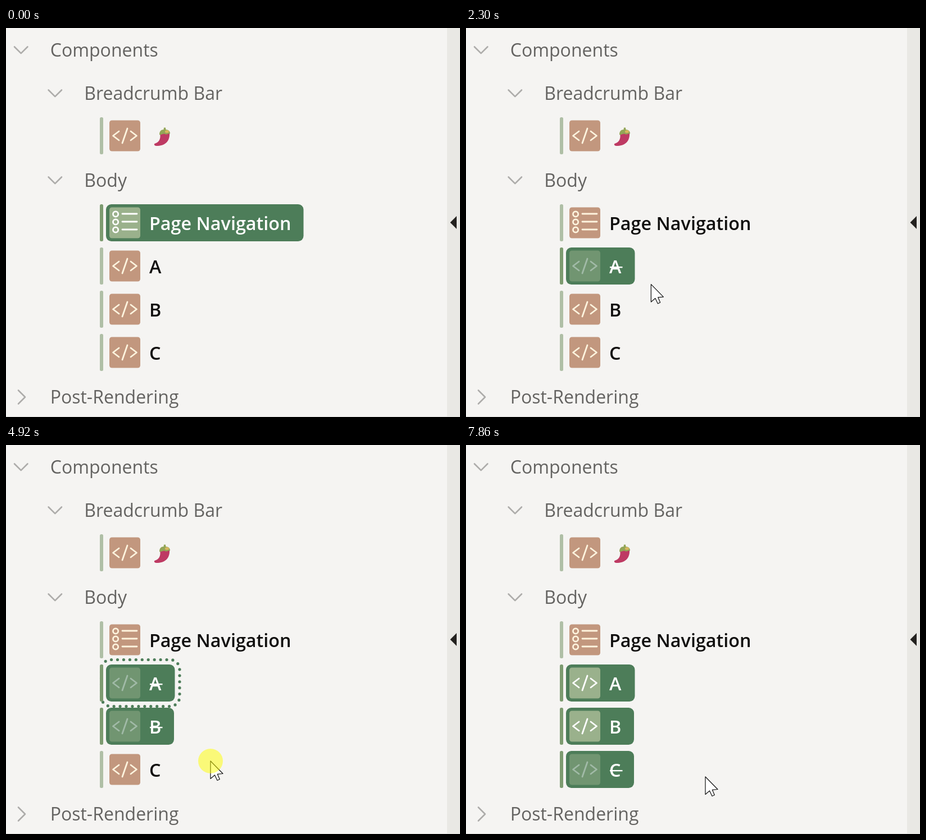
An HTML page that plays this animation: 808 by 693 pixels, repeating every 8 s.

```html
<!DOCTYPE html>
<html lang="en">
<head>
<meta charset="utf-8">
<title>Component tree</title>
<style>
  html, body { margin: 0; width: 100%; height: 100%; overflow: hidden; background: #f5f4f2; }
  svg { display: block; width: 808px; height: 693px; }
  text { font: 32px "Open Sans", "Noto Sans", sans-serif; fill: #646361; }
  .chevron { fill: none; stroke: #adacaa; stroke-width: 2.6; stroke-linecap: round; stroke-linejoin: round; }
  .pill { fill: none; }
  .bar { fill: #afbfa6; }
  .tile { fill: #c2977e; }
  .glyph { fill: none; stroke: #fff4de; stroke-width: 2.8; stroke-linecap: round; stroke-linejoin: round; }
  .label { font-size: 32.3px; font-weight: 600; fill: #100f0e; }
  .strike { fill: #100f0e; visibility: hidden; }
  .ring { fill: none; stroke: #4d7d59; stroke-width: 5.2; stroke-linecap: round; visibility: hidden; }
  .hover .pill { fill: #ebe9e6; }
  .selected .pill { fill: #4d7d59; }
  .selected .bar { fill: #7d9b70; }
  .selected .tile { fill: #9ab18c; }
  .selected .glyph { stroke: #fff; }
  .selected .label, .selected .strike { fill: #fff; }
  .struck .icon { opacity: .47; }
  .struck .strike, .focus .ring { visibility: visible; }
</style>
</head>
<body>
<svg viewBox="0 0 808 693">
  <rect width="808" height="693" fill="#f5f4f2"/>
  <rect x="785" width="23" height="693" fill="#e9e8e4"/>
  <rect y="692" width="808" height="1" fill="#dfdedb"/>
  <path d="M790.500 346.500L802 335V358Z" fill="#24221f"/>
  <g id="tree"></g>
  <g id="pepper">
    <path d="M274 188C276 198 272 204 264.500 206C262.500 208 265 210 268 210C282 210 292 203 291 187Z" fill="#be3a63"/>
    <path d="M273 190C273 184 276 181 280.500 181L281 177.500H284L284.500 181C289 181 292.500 184 292 188.500C288 187 286 191 283 189C280 187.500 277 191 273 190Z" fill="#93a557"/>
    <ellipse cx="286.500" cy="184.500" rx="3.600" ry="2.500" fill="#d8b65e"/>
  </g>
  <path id="cursor" d="M0 0V31.500L7.500 25L12 34.500L16.300 32.500L12.300 23.300L22 22.500Z"
        fill="#fff" stroke="#111" stroke-width="1.200" stroke-linejoin="round"/>
  <circle id="press" r="22" fill="#ff0" fill-opacity=".5"/>
</svg>
<script>
const LOOP = 8000, STEP = 70, PRESS = 130;
const byId = id => document.getElementById(id);
const lineTop = line => Math.round(159.3 + 77.2 * (line - 2));

const CODE = "M201 25L190.500 33L201 41M216 20L207 46M222 25L232.500 33L222 41";
const LIST = [0, 1, 2].map(i =>
  `M190.500 ${17.5 + 14 * i}a4.600 4.600 0 1 0 9.200 0a4.600 4.600 0 1 0 -9.200 0m16.500 -.5h26`).join("");

const HEADS = [
  { line: 0, depth: 0, name: "Components" },
  { line: 1, depth: 1, name: "Breadcrumb Bar" },
  { line: 3, depth: 1, name: "Body" },
  { line: 8, depth: 0, name: "Post-Rendering", closed: true }
];

const ROWS = [
  { key: "icon", line: 2, width: 121, name: "", glyph: CODE },
  { key: "P", line: 4, width: 351.5, name: "Page Navigation", glyph: LIST },
  { key: "A", line: 5, width: 122.5, name: "A", glyph: CODE },
  { key: "B", line: 6, width: 121, name: "B", glyph: CODE },
  { key: "C", line: 7, width: 121, name: "C", glyph: CODE }
];

const EVENTS = [
  { at: 690, type: "focus", key: "P" },
  { at: 820, type: "click", key: "A" },
  { at: 1550, type: "toggle" },
  { at: 2700, type: "click", key: "B" },
  { at: 3310, type: "toggle" },
  { at: 4380, type: "add", key: "A" },
  { at: 5050, type: "add", key: "C" },
  { at: 6190, type: "toggle" },
  { at: 7000, type: "toggle" },
  { at: 7860, type: "toggle" }
];

const easeOut = u => Math.sin(u * Math.PI / 2);
const easeInOut = u => (1 - Math.cos(u * Math.PI)) / 2;

// Each move follows a quadratic curve: start, control, end.
const MOVES = [
  { from: 70, to: 560, ease: easeOut, path: [[691, 672], [440, 480], [260, 435]] },
  { from: 1880, to: 2510, ease: easeInOut, path: [[260, 435], [370, 410], [310, 490]] },
  { from: 3840, to: 4190, ease: easeInOut, path: [[310, 490], [300, 450], [281, 427]] },
  { from: 4380, to: 4590, ease: easeInOut, path: [[281, 427], [305, 480], [364, 563]] },
  { from: 5180, to: 5390, ease: easeInOut, path: [[364, 563], [390, 585], [426, 591]] }
];

function ring(width) {
  const r = 17, w = width + 17 - 2 * r, h = 83 - 2 * r;
  const length = 2 * (w + h) + 2 * Math.PI * r;
  const gap = length / Math.round(length / 11);
  const arc = (x, y) => `a${r} ${r} 0 0 1 ${x} ${y}`;
  return `<path class="ring" stroke-dasharray="0 ${gap}" d="M169.500 57.500v${-h}${arc(r, -r)}h${w}${arc(r, r)}v${h}${arc(-r, r)}h${-w}${arc(-r, -r)}"/>`;
}

function head({ line, depth, name, closed }) {
  const x = 26.7 + 60.6 * depth, y = lineTop(line) + 34.5;
  const arrow = closed ? "M-4.700 -12l12 12l-12 12" : "M-11.700 -6l11.700 11.700l11.700 -11.700";
  return `<path class="chevron" transform="translate(${x} ${y})" d="${arrow}"/>
    <text x="${x + 52}" y="${y + 11.5}">${name}</text>`;
}

function row({ key, line, width, name, glyph }) {
  return `<g id="row-${key}" transform="translate(0 ${lineTop(line)})">
    ${ring(width)}
    <rect class="pill" x="178" width="${width}" height="66" rx="9.500"/>
    <rect class="bar" x="167" width="6" height="66" rx="2.500"/>
    <g class="icon">
      <rect class="tile" x="184" y="5.500" width="55" height="55" rx="4.500"/>
      <path class="glyph" d="${glyph}"/>
    </g>
    <text class="label" x="255" y="46">${name}</text>
    <rect class="strike" x="256" y="34" width="22.500" height="2.400"/>
  </g>`;
}

byId("tree").innerHTML = HEADS.map(head).join("") + ROWS.map(row).join("");

function stateAt(t) {
  let selected = new Set(["P"]), focus = null;
  const struck = new Set();
  for (const { at, type, key } of EVENTS) {
    if (at > t) break;
    if (type === "click") selected = new Set([key]);
    if (type === "add") selected.add(key);
    if (type === "toggle") selected.forEach(k => struck.delete(k) || struck.add(k));
    focus = type === "toggle" ? null : key;
  }
  return { selected, struck, focus };
}

function pointerAt(t) {
  const move = MOVES.findLast(m => m.from <= t);
  if (!move) return [-99, -99];
  const { from, to, ease, path: [a, b, c] } = move;
  const steps = Math.round((to - from) / STEP);
  const u = ease(Math.min(1, Math.floor((t - from) / STEP) / steps));
  return [0, 1].map(i => (1 - u) ** 2 * a[i] + 2 * u * (1 - u) * b[i] + u * u * c[i]);
}

const isPress = t => EVENTS.some(({ at, type }) =>
  (type === "click" || type === "add") && t >= at - PRESS && t < at);

function draw(t) {
  const { selected, struck, focus } = stateAt(t);
  const [x, y] = pointerAt(t);

  for (const { key, line, width } of ROWS) {
    const top = lineTop(line);
    const list = byId("row-" + key).classList;
    list.toggle("selected", selected.has(key));
    list.toggle("struck", struck.has(key));
    list.toggle("focus", focus === key);
    list.toggle("hover", x >= 178 && x <= 178 + width && y >= top && y <= top + 66);
  }

  for (const id of ["cursor", "press"])
    byId(id).setAttribute("transform", `translate(${x} ${y})`);
  byId("press").setAttribute("visibility", isPress(t) ? "visible" : "hidden");
}

const start = performance.now();
function tick() {
  draw((performance.now() - start) % LOOP);
  requestAnimationFrame(tick);
}
tick();
</script>
</body>
</html>
```
